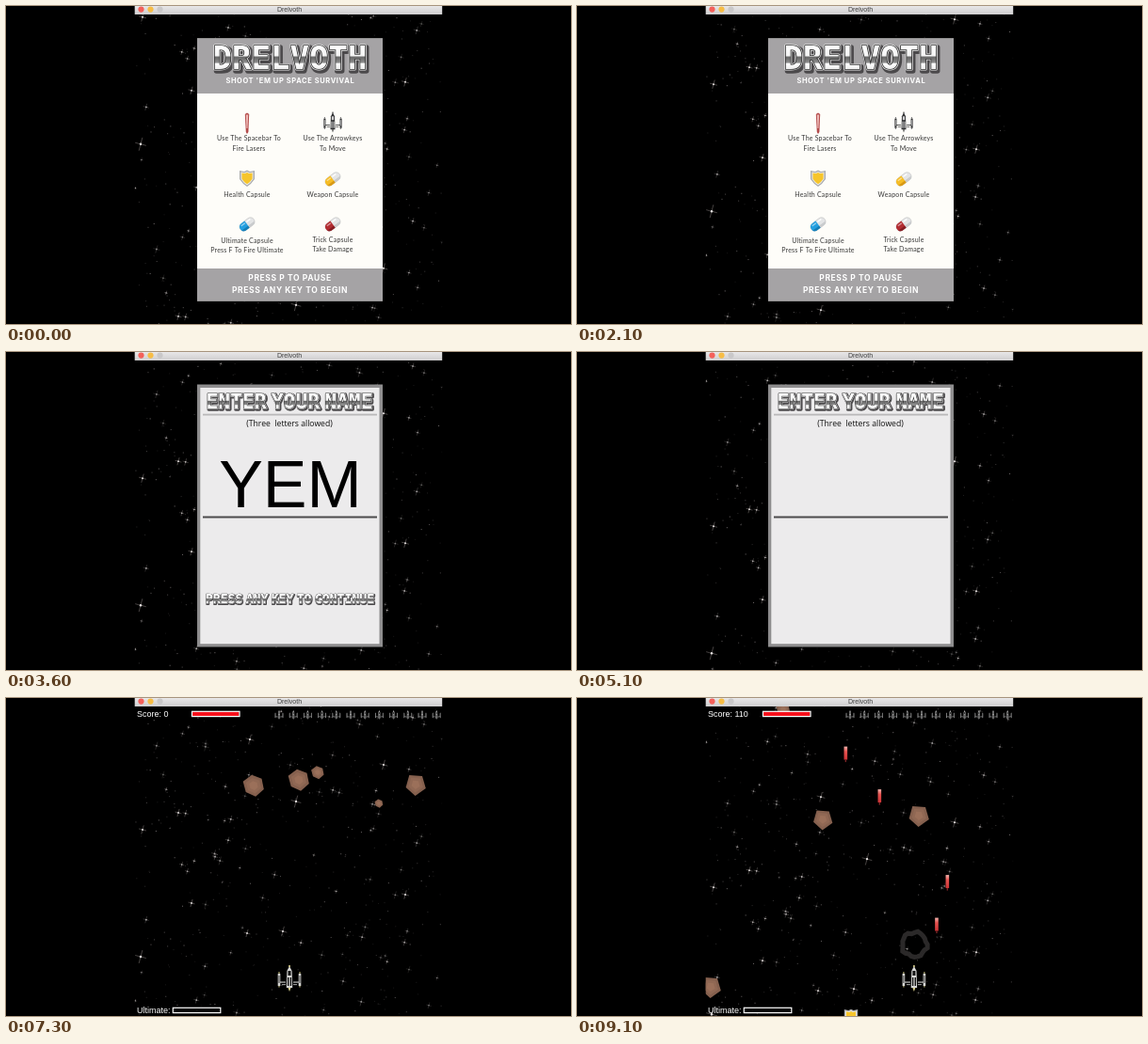
Recreate the animation shown at these times as an HTML page with a canvas. Size 600x338 px, loop 9.2 s.

```html
<!DOCTYPE html>
<html lang="en">
<head>
<meta charset="utf-8">
<title>Drelvoth</title>
<style>
html, body { margin: 0; width: 100%; height: 100%; overflow: hidden; background: #000; }
canvas { display: block; width: 600px; height: 338px; }
</style>
</head>
<body>
<canvas id="stage"></canvas>
<script>
const NAME = 'Drelvoth';
const LOOP = 9200, STEP = 100;
const LEFT = 136.7, TOP = 9, WIDTH = 326.5, HEIGHT = 329;
const ENTRY = 2500, GAME = 6700;
const SANS = '"Liberation Sans", Arial, sans-serif';
const MONO = '"DejaVu Sans Mono", monospace';

const canvas = document.getElementById('stage');
const g = canvas.getContext('2d');
const dpr = window.devicePixelRatio || 1;
canvas.width = 600 * dpr;
canvas.height = 338 * dpr;

function rect(x, y, w, h, color) {
  g.fillStyle = color;
  g.fillRect(x, y, w, h);
}

function disc(x, y, r, color) {
  g.fillStyle = color;
  g.beginPath();
  g.arc(x, y, r, 0, Math.PI * 2);
  g.fill();
}

function poly(points, color) {
  g.fillStyle = color;
  g.beginPath();
  points.forEach(([x, y]) => g.lineTo(x, y));
  g.closePath();
  g.fill();
}

function text(str, x, y, font, color, align = 'center', spacing = 0) {
  g.font = font;
  g.letterSpacing = spacing + 'px';
  g.textAlign = align;
  g.fillStyle = color;
  g.fillText(str, x, y);
  g.letterSpacing = '0px';
}

function at(x, y, draw, scale = 1, angle = 0) {
  g.save();
  g.translate(x, y);
  g.rotate(angle);
  g.scale(scale, scale);
  draw();
  g.restore();
}

// Metallic block lettering with narrow word gaps
function chrome(str, x, y, size) {
  const cap = size * 0.73, edge = size / 11;
  const fill = g.createLinearGradient(0, y - cap, 0, y);
  [[0, '#fff'], [0.42, '#f4f4f4'], [0.5, '#666'], [0.72, '#8e8e8e'], [0.77, '#fff'], [1, '#eee']]
    .forEach(([p, c]) => fill.addColorStop(p, c));
  g.lineJoin = 'round';
  g.font = `bold ${size}px ${MONO}`;
  g.wordSpacing = -0.36 * size + 'px';
  g.textAlign = 'center';
  const outline = (color, width, shift) => {
    g.strokeStyle = color;
    g.lineWidth = edge * width;
    g.strokeText(str, x + edge * shift, y + edge * shift);
  };
  outline('#4b494b', 1.8, 0.5);
  outline('#eee', 1, 0);
  outline('#333', 0.55, 0);
  g.fillStyle = fill;
  g.fillText(str, x, y);
  g.wordSpacing = '0px';
}

// Star field, one tile high, wrapping as it scrolls
const TILE = 336;
let seed = 4711;
function random() {
  seed = (seed * 16807) % 2147483647;
  return seed / 2147483647;
}

const stars = [[143, 275, 6], [308, 110, 5.5], [259, 44, 4.5], [401, 71, 4.5], [145, 140, 4],
  [183, 122, 3.5], [256, 250, 3.5], [294, 248, 4.5], [424, 209, 4], [197, 218, 3.5]]
  .map(([x, y, size]) => ({ x, y: y - TOP, size, glow: 0.9 }));
for (let i = 0; i < 500; i++) {
  const spiked = i < 85;
  stars.push({
    x: LEFT + random() * WIDTH,
    y: random() * TILE,
    size: spiked ? 1.5 + random() * 2.5 : 0,
    glow: spiked ? 0.25 + random() * 0.45 : 0.1 + random() ** 2 * 0.4
  });
}

function drawStars(t) {
  const shift = 0.034 * (t - 7300) + (t < GAME ? 120 : 0) + TILE * 4;
  for (const s of stars) {
    const y = TOP + (s.y + shift) % TILE;
    g.globalAlpha = s.glow;
    if (!s.size) {
      rect(s.x - 0.5, y - 0.5, 1, 1, '#e9dfe0');
      continue;
    }
    disc(s.x, y, 0.5 + s.size * 0.12, '#fff');
    g.globalAlpha = s.glow * 0.55;
    g.strokeStyle = '#d8cccb';
    g.lineWidth = 0.6;
    at(s.x, y, () => {
      g.beginPath();
      g.moveTo(-s.size, 0);
      g.lineTo(s.size, 0);
      g.moveTo(0, -s.size * 1.2);
      g.lineTo(0, s.size * 1.2);
      g.stroke();
    }, 1, 0.26);
  }
  g.globalAlpha = 1;
}

function drawTitleBar() {
  const shade = g.createLinearGradient(0, 0, 0, TOP);
  shade.addColorStop(0, '#e8e7e8');
  shade.addColorStop(1, '#cfcecf');
  rect(LEFT, 0, WIDTH, TOP, shade);
  ['#f4605a', '#f7bd45', '#c9c8c9'].forEach((c, i) => disc(143.5 + i * 10, 3.6, 3.1, c));
  text(NAME, 301, 6.2, `7px ${SANS}`, '#3c3c3c');
}

function ship(line, body, tip) {
  for (const side of [-1, 1]) {
    rect(side * 7.5 - 3.5, 3.5, 7, 1.1, line);
    rect(side * 6 - 2, 6.3, 4, 0.8, line);
    rect(side * 11 - 1.3, -5, 2.6, 13, line);
    rect(side * 11 - 0.4, -3, 0.8, 8, body);
    rect(side * 11 - 0.5, -7, 1, 2, tip);
    rect(side * 11 - 0.5, 8, 1, 1.5, tip);
  }
  poly([[0, -13], [2.6, -8], [3.2, 10], [-3.2, 10], [-2.6, -8]], line);
  rect(-1.5, -8, 3, 5, body);
  rect(-2, -1, 1.4, 9, body);
  rect(0.7, -1, 1.4, 9, body);
  rect(-0.8, -14, 1.6, 2, tip);
  poly([[-1.5, 10], [1.5, 10], [0, 14]], tip);
}

function shield() {
  const shape = k => [[-8, -8], [-3, -7], [0, -8.5], [3, -7], [8, -8], [8, 1], [4, 6], [0, 9], [-4, 6], [-8, 1]]
    .map(([x, y]) => [x * k, y * k]);
  poly(shape(1), '#a9abae');
  poly(shape(0.82), '#ececec');
  poly(shape(0.7), '#f6c52c');
}

function pill(x, y, color, dark) {
  at(x, y, () => {
    g.beginPath();
    g.roundRect(-9, -4.5, 18, 9, 4.5);
    g.fillStyle = '#e4e5e6';
    g.fill();
    g.strokeStyle = '#bbb';
    g.lineWidth = 0.5;
    g.stroke();
    g.clip();
    rect(-9, -5, 9, 10, color);
    rect(-9, 2, 9, 3, dark);
    rect(0, 2, 9, 3, '#c9cbcd');
    rect(-6, -3, 5, 1.3, '#ffffff88');
    rect(1, -3, 5, 1.3, '#fff');
  }, 1, -0.65);
}

function label(x, y, ...lines) {
  lines.forEach((s, i) => text(s, x, y + i * 10.2, '7px Lato, sans-serif', '#383838', 'center', 0.2));
}

function drawGuide() {
  const bold = size => `bold ${size}px Inter, sans-serif`;
  rect(203, 34.5, 197, 279, '#fefdf9');
  rect(203, 34.5, 197, 58.5, '#a5a3a5');
  rect(203, 279, 197, 34.5, '#a5a3a5');
  chrome(NAME.toUpperCase(), 301.5, 67, 34);
  text("SHOOT 'EM UP SPACE SURVIVAL", 301.8, 82.3, bold(7.5), '#fff', 'center', 0.6);
  text('PRESS P TO PAUSE', 301.5, 292, bold(8.5), '#fff', 'center', 0.6);
  text('PRESS ANY KEY TO BEGIN', 301.5, 304.8, bold(8.5), '#fff', 'center', 0.6);

  poly([[253.8, 115], [256, 113.5], [258.2, 115], [257.4, 134], [256, 136], [254.8, 134]], '#b34a4a');
  poly([[254.8, 115.5], [257.2, 115.5], [256.5, 130], [255.4, 130]], '#edb9b5');
  at(347, 123.5, () => ship('#2f3032', '#d0d0d0', '#555'), 0.78);
  at(256, 183, shield);
  pill(347, 184, '#f6bd25', '#d99a16');
  pill(256, 232, '#249fdf', '#157db6');
  pill(347, 232, '#b22d32', '#861d23');

  label(258, 143.3, 'Use The Spacebar To', 'Fire Lasers');
  label(347, 143.3, 'Use The Arrowkeys', 'To Move');
  label(256, 202.5, 'Health Capsule');
  label(347, 202.5, 'Weapon Capsule');
  label(256, 251.5, 'Ultimate Capsule', 'Press F To Fire Ultimate');
  label(347, 251, 'Trick Capsule', 'Take Damage');
}

const typed = [[2900, 'Y'], [3100, 'YE'], [3300, 'YEM'], [4400, 'YE'], [4600, 'Y'], [4800, ''],
  [5500, 'W'], [5700, 'WY'], [5900, 'WYL']];

function drawEntry(t) {
  const word = typed.reduce((now, [start, s]) => t >= start ? s : now, '');
  rect(203, 34.5, 197, 279, '#8e8d8e');
  rect(206.3, 38, 190.2, 272.2, '#ecebec');
  chrome('ENTER YOUR NAME', 301, 60.3, 21.3);
  rect(209, 65.7, 185, 1.8, '#b9b8b9');
  text('(Three  letters allowed)', 301, 79, '8.64px "Open Sans", "Noto Sans", sans-serif', '#111');
  text(word, 302, 165, `70px ${SANS}`, '#000');
  rect(209, 174.5, 185, 2, '#4c4b4c');
  if (word.length === 3) chrome('PRESS ANY KEY TO CONTINUE', 301.5, 267.2, 13.2);
}

// Rocks: position at time t0, velocity in px/s, optional time of destruction
const rocks = [
  { x: 263, y: 93, vx: 9, vy: 90, r: 11.5, n: 6, t0: 7300, end: 8216 },
  { x: 311, y: 87, vx: -25, vy: 75, r: 11.5, n: 6, t0: 7300, end: 8114 },
  { x: 331, y: 79, vx: 23, vy: 154, r: 7, n: 6, t0: 7300, end: 8488 },
  { x: 396, y: 112, vx: 10, vy: 140, r: 4.6, n: 6, t0: 7300 },
  { x: 435, y: 92, vx: -6, vy: 150, r: 11.5, n: 5, t0: 7300 },
  { x: 261, y: 129, vx: 5, vy: 90, r: 11, n: 5, t0: 9100 },
  { x: 363, y: 125, vx: -8, vy: 110, r: 11.5, n: 5, t0: 9100 },
  { x: 142, y: 307, vx: 12, vy: 100, r: 11.5, n: 5, t0: 9100 },
  { x: 219, y: 12, vx: 6, vy: 60, r: 7.5, n: 6, t0: 9100 }
];

const place = (k, t) => [k.x + k.vx * (t - k.t0) / 1000, k.y + k.vy * (t - k.t0) / 1000];

function drawRock(k, t) {
  const [x, y] = place(k, t);
  const ring = r => Array.from({ length: k.n }, (_, i) => {
    const a = i / k.n * Math.PI * 2;
    const d = r * (1 + 0.06 * Math.sin(i * 2.4));
    return [Math.cos(a) * d, Math.sin(a) * d];
  });
  at(x, y, () => {
    poly(ring(k.r), '#85604e');
    poly(ring(k.r * 0.72), '#906854');
    poly(ring(k.r * 0.42), '#9b705a');
  }, 1, 0.35 + (t - k.t0) * 0.0015);
}

function drawBlast(k, t) {
  const p = (t - k.end) / 700;
  if (p < 0 || p > 1) return;
  const [x, y] = place(k, k.end);
  const r = 5 + p * 9.2;
  g.beginPath();
  for (let i = 0; i < 24; i++) {
    const a = i / 24 * Math.PI * 2;
    const d = r + Math.sin(a * 5 + 1) * 0.9 + Math.sin(a * 8) * 0.6;
    g.lineTo(x + Math.cos(a) * d, y + Math.sin(a) * d);
  }
  g.closePath();
  if (p < 0.35) {
    g.fillStyle = p < 0.18 ? '#ffe08a' : '#e08a35';
    g.fill();
  }
  const gray = Math.round(120 - 90 * p);
  g.strokeStyle = p < 0.35 ? '#b5602a' : `rgb(${gray + 2},${gray},${gray})`;
  g.lineWidth = 5;
  g.stroke();
}

// The ship waits, runs left, right, then left again
const SPEED = 0.144;
function shipX(t) {
  if (t < 7500) return 301;
  if (t < 7771) return 301 - (t - 7500) * SPEED;
  if (t < 8766) return 262 + (t - 7771) * SPEED;
  return 406 - (t - 8766) * SPEED;
}

const hits = { 7433: 8114, 7683: 8216, 8433: 8488 };

function drawShots(t) {
  for (let start = 7433; start <= t; start += 250) {
    if (t >= (hits[start] || LOOP)) continue;
    const x = shipX(start), y = 272 - (t - start) * 0.182;
    const red = g.createLinearGradient(0, y - 8, 0, y + 7);
    red.addColorStop(0, '#f3b3ad');
    red.addColorStop(0.35, '#e5524f');
    red.addColorStop(1, '#c92f32');
    rect(x - 1.8, y - 8, 3.6, 14, red);
    rect(x - 0.7, y + 6, 1.4, 2.5, '#7d2426');
  }
}

function bar(x, y, color) {
  if (color) rect(x, y, 50, 5.5, color);
  g.strokeStyle = '#fff';
  g.lineWidth = 1.2;
  g.strokeRect(x, y, 50.5, 5.3);
}

function drawGame(t) {
  rocks.forEach(k => { if (t < (k.end || LOOP)) drawRock(k, t); });
  if (t >= 8114) at(291, 148 + (t - 8114) * 0.193, shield, 0.9);
  drawShots(t);
  rocks.forEach(k => { if (k.end) drawBlast(k, t); });
  at(shipX(t), 298, () => ship('#d6d6d4', '#111', '#d8cf8c'));

  const score = t < 8114 ? 0 : t < 8216 ? 34 : t < 8488 ? 68 : 110;
  text('Score: ' + score, 139, 20, `9px ${SANS}`, '#fff', 'left');
  text('Ultimate:', 139, 334.5, `9px ${SANS}`, '#fff', 'left');
  bar(197.5, 14.3, '#f6101c');
  bar(177.3, 329.3);
  for (let i = 0; i < 12; i++) {
    at(290 + i * 15.2, 18, () => ship('#aaa', '#222', '#888'), 0.36);
  }
}

function draw(t) {
  g.setTransform(dpr, 0, 0, dpr, 0, 0);
  rect(0, 0, 600, 338, '#000');
  g.save();
  g.beginPath();
  g.rect(LEFT, TOP, WIDTH, HEIGHT);
  g.clip();
  drawStars(t);
  if (t < ENTRY) drawGuide();
  else if (t < GAME) drawEntry(t);
  else drawGame(t);
  g.restore();
  drawTitleBar();
}

const origin = performance.now();
function tick() {
  const t = (performance.now() - origin) % LOOP;
  draw(Math.floor(t / STEP) * STEP);
  requestAnimationFrame(tick);
}
tick();
</script>
</body>
</html>
```
